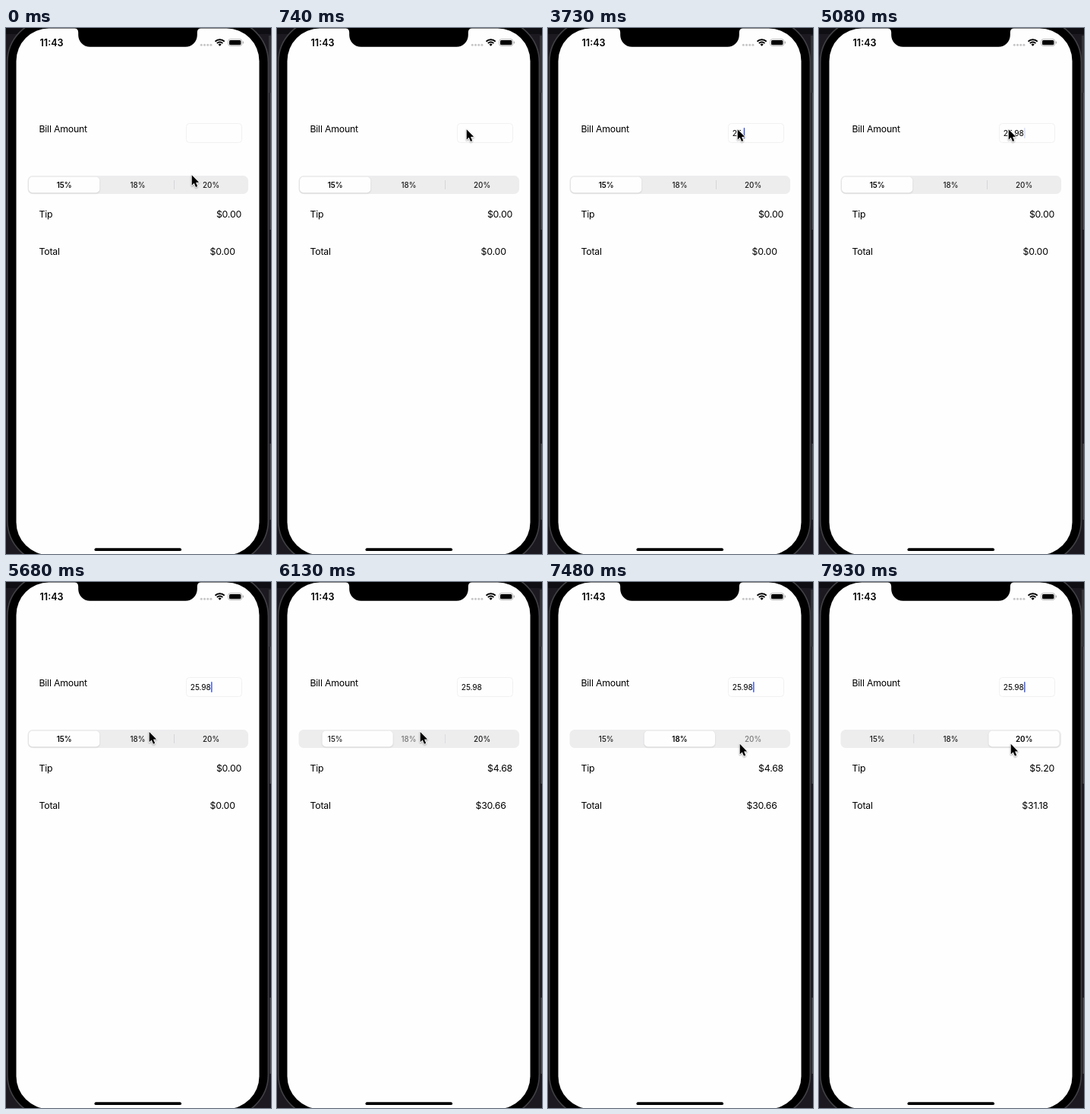
These frames come from a looping animation (349x691 px, 8000 ms). An HTML page with a canvas:

```html
<!DOCTYPE html>
<html lang="en">
<head>
<meta charset="utf-8">
<title>Tip calculator</title>
<style>
  html, body { margin: 0; width: 100%; height: 100%; overflow: hidden; background: #1c1a20; }
  canvas { display: block; width: 349px; height: 691px; }
</style>
</head>
<body>
<canvas id="stage"></canvas>
<script>
const W = 349, H = 691, LOOP = 8000, TICK = 150;
const canvas = document.getElementById('stage');
const ctx = canvas.getContext('2d');
const dpr = window.devicePixelRatio || 1;
canvas.width = W * dpr;
canvas.height = H * dpr;

const BILL = '25.98', RATES = [.15, .18, .2];
const FOCUS = 1190, KEYS = [2300, 3060, 3640, 4250, 4490];
const TAPS = [6040, 7540], SLIDE_MS = 300;

// Resting places of the pointer and when it leaves each for the next.
const STOPS = [
  { x: 244.7, y: 193.2, leave: 0, travel: 150 },
  { x: 249.2, y: 177, leave: 300, travel: 450 },
  { x: 249.7, y: 133.2, leave: 5100, travel: 600 },
  { x: 188.7, y: 196.9, leave: 6750, travel: 600 },
  { x: 252.7, y: 212.8 }
];

const clamp = v => Math.min(1, Math.max(0, v));
const ease = v => { const u = clamp(v); return u * u * (3 - 2 * u); };

function pointerAt(t) {
  let { x, y } = STOPS[0];
  STOPS.slice(1).forEach((stop, i) => {
    const k = ease((t - STOPS[i].leave) / STOPS[i].travel);
    x += (stop.x - x) * k;
    y += (stop.y - y) * k;
  });
  return { x, y };
}

// The blink restarts with every key: half a second on, a quick fade, then off.
function caretAt(t) {
  if (t < FOCUS) return 0;
  const last = Math.max(FOCUS, ...KEYS.filter(k => k <= t));
  return clamp(1 - ((t - last) % 1000 - 500) / 140);
}

const typedAt = t => BILL.slice(0, KEYS.filter(k => k <= t).length);
const selectedAt = t => TAPS.filter(tap => tap <= t).length;
const slideAt = t => TAPS.reduce((sum, tap) => sum + ease((t - tap) / SLIDE_MS), 0);
const isPressed = (i, t) => i > 0 && t > TAPS[i - 1] - 60 && t < TAPS[i - 1] + 200;

function box(x, y, w, h, r, fill) {
  ctx.beginPath();
  ctx.roundRect(x, y, w, h, r);
  if (fill) {
    ctx.fillStyle = fill;
    ctx.fill();
  }
}

function outline(color, width) {
  ctx.strokeStyle = color;
  ctx.lineWidth = width;
  ctx.stroke();
}

function label(str, x, y, size, { weight = 400, align = 'left', color = '#000', spacing = 0 } = {}) {
  ctx.font = `${weight} ${size}px Inter, sans-serif`;
  ctx.letterSpacing = spacing + 'px';
  ctx.textAlign = align;
  ctx.fillStyle = color;
  ctx.fillText(str, x, y);
  return ctx.measureText(str).width;
}

function drawPhone() {
  ctx.fillStyle = '#1c1a20';
  ctx.fillRect(0, 0, W, H);
  ctx.fillStyle = '#0f0e12';
  ctx.fillRect(0, 0, W, 8);
  ctx.fillStyle = '#343337';
  ctx.fillRect(346, 10, 3, 75);
  ctx.fillStyle = '#4a494d';
  ctx.fillRect(347.5, 85, 1.5, 180);
  ctx.fillRect(347.5, 546, 1.5, 100);

  box(1.8, -11, 343.6, 714, 56, '#000');
  outline('#414044', 1.6);
  box(13.5, .5, 320, 691.7, 43, '#fefefe');

  // Notch with flared upper corners
  const mid = 173.5;
  ctx.beginPath();
  ctx.moveTo(mid - 83, 0);
  ctx.quadraticCurveTo(mid - 78.3, .8, mid - 78.3, 6);
  ctx.arcTo(mid - 78.3, 24.8, mid, 24.8, 15.5);
  ctx.arcTo(mid + 78.3, 24.8, mid + 78.3, 6, 15.5);
  ctx.lineTo(mid + 78.3, 6);
  ctx.quadraticCurveTo(mid + 78.3, .8, mid + 83, 0);
  ctx.fillStyle = '#000';
  ctx.fill();
  box(116.5, 683.3, 114.5, 3.8, 1.9, '#000');
}

function drawStatus() {
  label('11:43', 44.5, 23.6, 12.6, { weight: 600 });
  ctx.fillStyle = '#c6c6c8';
  for (let i = 0; i < 4; i++) {
    ctx.beginPath();
    ctx.arc(257.3 + i * 4.2, 22.3, 1.5, 0, 7);
    ctx.fill();
  }
  const wifi = r => {
    ctx.beginPath();
    ctx.arc(281.6, 23.8, r, -Math.PI * .75, -Math.PI * .25);
  };
  for (const r of [5.3, 8.6]) {
    wifi(r);
    outline('#000', 1.9);
  }
  wifi(3);
  ctx.lineTo(281.6, 23.8);
  ctx.fillStyle = '#000';
  ctx.fill();

  box(292.7, 14.7, 18, 8.8, 2.7);
  outline('#a5a5a7', .8);
  box(294, 16, 15.4, 6.2, 1.5, '#000');
  box(311.8, 17.6, 1.1, 3, .6, '#a5a5a7');
}

function drawField(t) {
  box(237.5, 125.5, 73, 25, 4, '#fefefe');
  outline('#f1f1f2', 1);
  const width = label(typedAt(t), 242.8, 141.9, 10.2, { spacing: -.1 });
  ctx.globalAlpha = caretAt(t);
  box(243.1 + width, 131, 1.5, 14, .7, '#3f5be6');
  ctx.globalAlpha = 1;
}

function drawSegments(t) {
  const pos = slideAt(t), step = 96.7;
  box(28.5, 194, 290.5, 24, 6.5, '#ededee');
  [pos - 1, 1 - pos].forEach((alpha, i) => {
    ctx.globalAlpha = clamp(alpha);
    ctx.fillStyle = '#d3d3d5';
    ctx.fillRect(124.3 + i * step, 200, .9, 12);
  });
  ctx.globalAlpha = 1;

  ctx.save();
  ctx.shadowColor = 'rgba(0,0,0,.15)';
  ctx.shadowBlur = 2 * dpr;
  ctx.shadowOffsetY = .8 * dpr;
  box(30 + pos * step, 195.5, 93.3, 21, 5, '#fefefe');
  ctx.restore();

  RATES.forEach((rate, i) => {
    label(Math.round(rate * 100) + '%', 76.7 + i * step, 209.7, 9.8, {
      weight: pos === i ? 600 : 500,
      align: 'center',
      color: isPressed(i, t) ? '#777' : pos === i ? '#000' : '#1a1a1a'
    });
  });
}

function drawAmounts(t) {
  const left = { spacing: -.2 }, right = { spacing: -.2, align: 'right' };
  const selected = selectedAt(t);
  const bill = selected ? Number(BILL) : 0;
  const tip = bill * RATES[selected];
  const money = v => '$' + v.toFixed(2);
  label('Bill Amount', 43.5, 137.3, 12.3, left);
  label('Tip', 43.5, 249, 12.3, left);
  label('Total', 43.5, 298, 12.3, left);
  label(money(tip), 310, 249, 12.3, right);
  label(money(bill + tip), 301.7, 298, 12.3, right);
}

function drawPointer(t) {
  const { x, y } = pointerAt(t);
  ctx.save();
  ctx.translate(x, y);
  ctx.scale(.94, .94);
  ctx.beginPath();
  ctx.moveTo(0, 0);
  for (const [px, py] of [[0, 14.3], [3.2, 11.3], [5.6, 16.8], [8, 15.8], [5.7, 10.4], [10, 10.2]]) ctx.lineTo(px, py);
  ctx.closePath();
  ctx.shadowColor = 'rgba(0,0,0,.35)';
  ctx.shadowBlur = 2 * dpr;
  ctx.shadowOffsetY = dpr;
  ctx.lineJoin = 'round';
  outline('#fff', 1.8);
  ctx.shadowColor = 'transparent';
  ctx.fillStyle = '#000';
  ctx.fill();
  ctx.restore();
}

function frame() {
  // Motion advances in ticks, like a screen recording.
  const t = Math.floor((performance.now() % LOOP + 20) / TICK) * TICK;
  ctx.setTransform(dpr, 0, 0, dpr, 0, 0);
  drawPhone();
  drawStatus();
  drawField(t);
  drawSegments(t);
  drawAmounts(t);
  drawPointer(t);
  requestAnimationFrame(frame);
}
frame();
</script>
</body>
</html>
```
